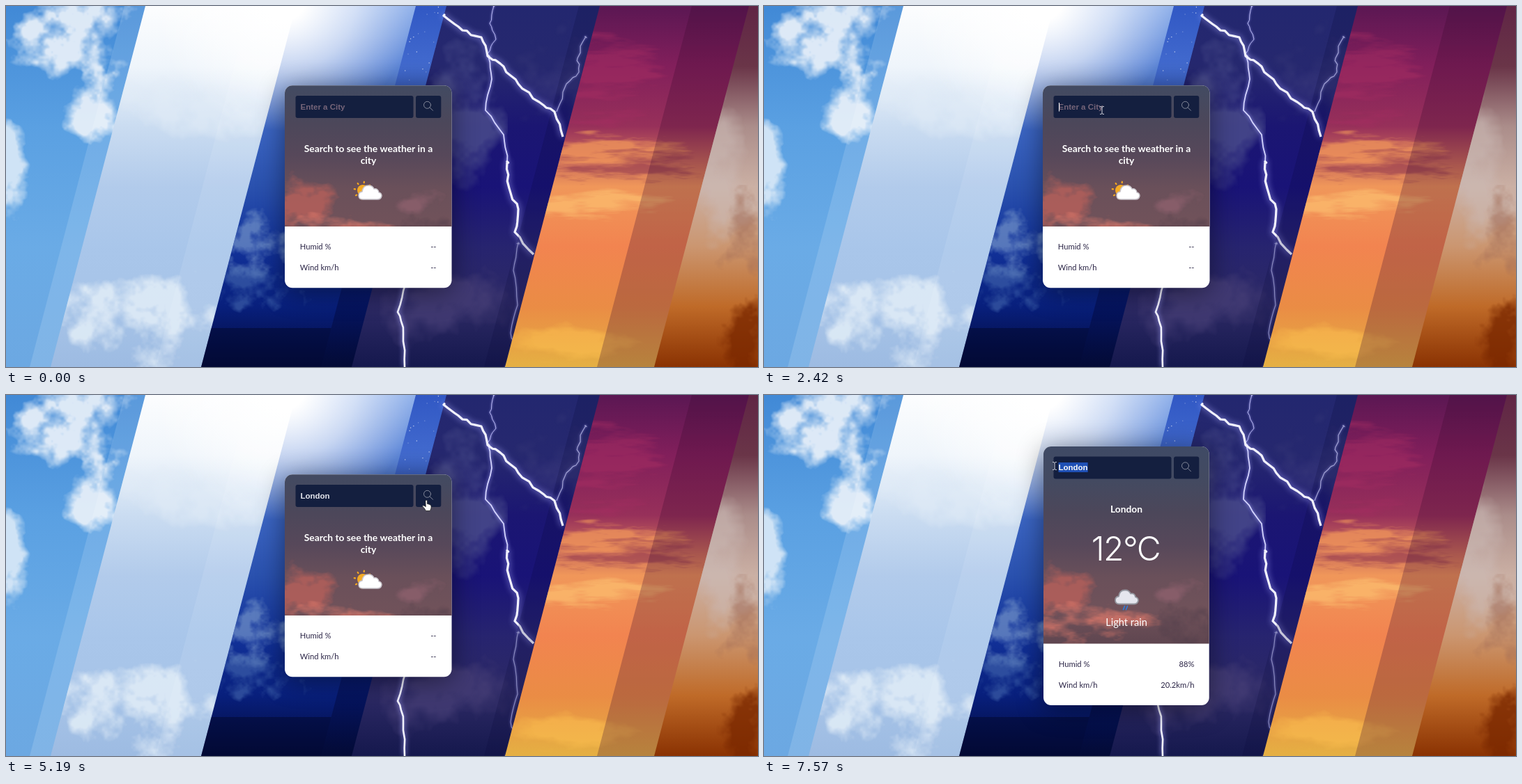
These frames come from a looping animation (1079x519 px, 8000 ms). An HTML page with a canvas:

```html
<!DOCTYPE html>
<html lang="en">
<head>
<meta charset="utf-8">
<title>Weather card</title>
<style>
  html, body { margin: 0; width: 100%; height: 100%; overflow: hidden; }
  canvas { display: block; }
</style>
</head>
<body>
<canvas id="stage" width="1079" height="519"></canvas>
<script>
const W = 1079, H = 519, LEAN = 136, LOOP = 8000;
const LATO = 'Lato, sans-serif';
const ARIAL = 'bold 11.5px "Liberation Sans", Arial, sans-serif';
const stage = document.getElementById('stage').getContext('2d');
let c = stage;

const clamp = v => Math.max(0, Math.min(1, v));
const smooth = k => k * k * (3 - 2 * k);
const mix = (a, b, k) => a + (b - a) * k;

function hash(x, y) {
  const s = Math.sin(x * 127.1 + y * 311.7) * 43758.5453;
  return s - Math.floor(s);
}

function noise(x, y) {
  const i = Math.floor(x), j = Math.floor(y), u = smooth(x - i), v = smooth(y - j);
  return mix(mix(hash(i, j), hash(i + 1, j), u), mix(hash(i, j + 1), hash(i + 1, j + 1), u), v);
}

function fractal(x, y) {
  let sum = 0;
  for (let o = 0, amp = 0.53; o < 4; o++, amp /= 2, x *= 2.1, y *= 2.1) sum += amp * noise(x, y);
  return sum;
}

function makeCanvas(w, h) {
  const canvas = document.createElement('canvas');
  canvas.width = w;
  canvas.height = h;
  return canvas;
}

function layer(paint) {
  const canvas = makeCanvas(W, H);
  c = canvas.getContext('2d');
  paint();
  c = stage;
  return canvas;
}

// Vertical gradient of evenly spaced colours
function fade(colors, y0 = 0, y1 = H) {
  const g = c.createLinearGradient(0, y0, 0, y1);
  colors.split(' ').forEach((color, i, all) => g.addColorStop(i / (all.length - 1), color));
  return g;
}

// Leaning stripe; x values are taken at the top edge
function band(x0, fill, paint, x1 = W + LEAN) {
  c.save();
  c.beginPath();
  c.moveTo(x0, 0);
  c.lineTo(x1, 0);
  c.lineTo(x1 - LEAN, H);
  c.lineTo(x0 - LEAN, H);
  c.clip();
  c.fillStyle = fill;
  c.fillRect(0, 0, W, H);
  if (paint) paint();
  c.restore();
}

// Ellipse with a billowing edge
function cloud(color, x, y, rx, ry, opacity = 0.9, grain = 34, stretch = 1) {
  const w = Math.ceil(rx * 2.6), h = Math.ceil(ry * 2.6), tile = makeCanvas(w, h), pen = tile.getContext('2d');
  const image = pen.createImageData(w, h), rgb = parseInt(color.slice(1), 16);
  for (let p = 0; p < w * h; p++) {
    const px = p % w - w / 2, py = Math.floor(p / w) - h / 2;
    const rim = (px / rx) ** 2 + (py / ry) ** 2;
    const body = fractal((px + x) / grain / stretch + 50, (py + y) / grain + 50);
    const alpha = clamp((body * 3 - 0.55 - rim) / 0.9) * opacity;
    image.data.set([rgb >> 16, rgb >> 8 & 255, rgb & 255, alpha * 255], p * 4);
  }
  pen.putImageData(image, 0, 0);
  c.drawImage(tile, x - w / 2, y - h / 2);
}

// Jagged bolt through "x,y" points
function bolt(route, width, color = '#f2f2ff') {
  const points = route.split(' ').map(p => p.split(',').map(Number));
  c.beginPath();
  points.forEach(([x, y], i) => {
    const [px, py] = points[Math.max(0, i - 1)];
    for (let k = 0.25; k < 1; k += 0.25) {
      c.lineTo(mix(px, x, k) + hash(x, k) * 4 - 2, mix(py, y, k) + hash(k, y) * 4 - 2);
    }
    c.lineTo(x, y);
  });
  c.strokeStyle = color;
  c.lineWidth = width;
  c.lineJoin = 'round';
  c.shadowColor = '#a8a8ff';
  c.shadowBlur = width * 3;
  c.stroke();
  c.shadowBlur = 0;
}

const sky = layer(() => {
  band(0, '#5aa0e2');
  c.fillStyle = fade('#4189d6 #5aa0e2 #6aabe6 #6ca8e2');
  c.fillRect(0, 0, W, H);
  cloud('#edf3fa', 95, 45, 95, 65);
  cloud('#edf3fa', 122, 140, 38, 70);
  cloud('#dceaf7', 4, 232, 30, 62);
  band(170, '#ffffff22');

  band(200, fade('#fcfdfe #eff5fb #cadcf1 #b2cbeb #a9c6ea #a7c4e8 #9dbbe2'), () => {
    cloud('#e3edf7', 270, 140, 120, 50, 0.6, 60);
    cloud('#e2edf7', 195, 450, 125, 65, 0.85);
  });

  band(416, fade('#8fb0ea #5f88d8 #3c66c4 #2a51ae #12329a #081f7c #030a3a'), () => {
    cloud('#6f8fc6', 355, 345, 55, 42, 0.75, 24);
    cloud('#4468ae', 350, 405, 75, 32, 0.6, 24);
    c.fillStyle = '#02083088';
    c.fillRect(0, 463, W, H);
  });
  const glare = c.createRadialGradient(400, -10, 30, 400, -10, 190);
  glare.addColorStop(0, '#fff');
  glare.addColorStop(0.45, '#ffffffa0');
  glare.addColorStop(1, '#ffffff00');
  c.fillStyle = glare;
  c.fillRect(200, 0, 400, 190);
  band(350, '#ffffff16', null, 416);

  band(588, fade('#3158c4 #426ace #3358ba #2346a6 #0c2690 #05145f #030a35'), () => {
    for (let i = 0; i < 34; i++) {
      c.fillStyle = i % 3 ? '#ffffff55' : '#ffffffbb';
      c.fillRect(565 + hash(i, 1) * 66, hash(i, 2) * 110, 1.2, 1.2);
    }
  });

  band(632, fade('#23276f #26286f #1b1672 #191377 #27246f #2c2964 #15184d'), () => {
    cloud('#50538f', 655, 140, 50, 130, 0.75, 60);
    cloud('#43437f', 790, 90, 60, 80, 0.5, 60);
    cloud('#4b4279', 640, 430, 80, 70, 0.65, 60);
    bolt('700,0 694,25 703,48 690,70', 1, '#b6b6f0');
    bolt('832,44 820,75 822,95 804,112 790,152', 1.2, '#c4c4f6');
    bolt('692,72 697,105 688,150 714,185 719,225', 1.8, '#d4d4ff');
    bolt('719,225 722,262 735,292 730,325 757,357', 3.2);
    bolt('735,340 728,380 734,430 724,470 735,495 716,519', 1.1, '#a9a9de');
    bolt('573,400 562,440 570,470 572,519', 2.6);
  });
  band(822, '#0a083830');
  bolt('628,14 655,35 682,45 691,72 714,87 735,112 765,138 787,152 799,188', 3.2);

  band(852, fade('#5b1753 #821f5b #97305a #f0975a #f28450 #ea8c45 #e5b043'), () => {
    cloud('#a82d62', 860, 105, 80, 60, 0.5, 14, 5);
    cloud('#f0955a', 870, 208, 110, 26, 0.8, 10, 6);
    cloud('#93384f', 880, 232, 110, 22, 0.6, 9, 6);
    cloud('#fcc070', 850, 285, 110, 22, 0.7, 12, 6);
    cloud('#ffc451', 800, 490, 90, 40, 0.5, 30, 2);
  });
  band(984, '#3a0a2d44');

  band(1066, fade('#602545 #6a3548 #ab8d8a #cbb0a4 #cb9670 #bf6a28 #8a3202'), () => {
    cloud('#cbbab6', 1025, 230, 65, 95, 0.6, 60);
    cloud('#a06a55', 1060, 335, 35, 60, 0.55);
    cloud('#7a2800', 1065, 475, 45, 55, 0.8);
  });
});

const photo = layer(() => {
  c.fillStyle = fade('#3f4a65 #434a61 #4c475a #57485a #6a505a #70525a #5f4650', 74, 357);
  c.fillRect(395, 70, 250, 290);
  cloud('#b9605a', 425, 275, 45, 42, 0.8, 24, 1.5);
  cloud('#8d606d', 600, 285, 35, 25, 0.8, 24, 1.5);
  cloud('#d9776a', 475, 332, 85, 30, 0.8, 20, 2);
  cloud('#4d3c49', 615, 332, 45, 35, 0.8);
});

function box(x, y, w, h, r, fill) {
  c.beginPath();
  c.roundRect(x, y, w, h, r);
  c.fillStyle = fill;
  c.fill();
}

function text(str, x, y, font, fill = '#fff', align = 'center') {
  c.font = font;
  c.fillStyle = fill;
  c.textAlign = align;
  c.fillText(str, x, y);
}

function shape(d, x, y, fill, stroke, width = 1) {
  const path = new Path2D(d);
  c.save();
  c.translate(x, y);
  c.lineJoin = c.lineCap = 'round';
  if (fill) { c.fillStyle = fill; c.fill(path); }
  if (stroke) { c.strokeStyle = stroke; c.lineWidth = width; c.stroke(path); }
  c.restore();
}

const CLOUD = 'M6 21Q0 21 0 15.5Q0 10.5 5 10Q6 1 14 1Q20 1 22 6Q28 5 29 11Q33 12 33 16Q32 21 27 21Z';

function sunIcon() {
  for (let a = 0; a < 8; a++) {
    c.save();
    c.translate(512, 265);
    c.rotate(a * Math.PI / 4 + 0.15);
    box(-1.1, -13.5, 2.2, 3.5, 1, '#f5a81f');
    c.restore();
  }
  box(504, 257, 16, 16, 8, '#f5ab25');
  shape(CLOUD, 506, 257, '#fff', '#c9c5cc', 1.5);
}

function rainIcon() {
  shape(CLOUD, 504, 279.5, '#e5e6ee', '#94969f', 1.8);
  shape('M2 0L0 5M6 0L4 5', 515.5, 303.5, null, '#3479d3', 1.8);
}

// Each move starts where the one before ended and advances in equal steps
const easeOut = k => 1 - (1 - k) ** 2.1;
const MOVES = [
  { from: 240, to: 1490, steps: 19, x: 485, y: 155, ease: easeOut },
  { from: 1560, to: 1630, steps: 2, x: 485, y: 150, ease: smooth },
  { from: 4570, to: 5190, steps: 9, x: 602, y: 150, ease: smooth, arc: 15 },
  { from: 6330, to: 7330, steps: 14, x: 411, y: 102, ease: smooth, easeY: k => 1 - (1 - smooth(k)) ** 4 },
  { from: 7400, to: 7570, steps: 3, x: 417, y: 102, ease: smooth }
];

function pointerAt(t) {
  let x = 1033, y = 508;
  for (const m of MOVES) {
    if (t < m.from) break;
    const step = Math.floor((t - m.from) / (m.to - m.from) * (m.steps - 1) + 1.1);
    const k = clamp(step / m.steps);
    x = mix(x, m.x, m.ease(k));
    y = mix(y, m.y, (m.easeY || m.ease)(k)) - (m.arc || 0) * Math.sin(Math.PI * k);
  }
  return [Math.round(x), Math.round(y)];
}

const REFOCUS = 6960, CLICK = 5190, RESULT = 5780;

function drawPointer(x, y, t, shift) {
  const row = y > 128 + shift && y < 161 + shift;
  if (t >= REFOCUS || (row && x > 415 && x < 585)) {
    shape('M-2.5-5.5Q0-5.5 0-4.5Q0-5.5 2.5-5.5M0-4.5V4.5M-2.5 5.5Q0 5.5 0 4.5Q0 5.5 2.5 5.5', x, y, null, '#d5d7df');
  } else if (row && x > 588 && x < 624) {
    shape('M0 1.5Q1.2-.5 2.4 1.5V6L4 6.3L6 7L8 8.5V12L6.5 16H.5L-2 12L-4.5 9.5Q-3.5 7.5-1.5 9L0 10Z', x, y + 0.5, '#fff', '#222', 0.8);
  } else {
    shape('M0 0V12.2L2.7 9.7L4.6 14L6.3 13.2L4.5 9H8.2Z', x, y, '#fff', '#222', 0.8);
  }
}

// The caret blinks after focus and stays on while typing
function caretOn(t) {
  if (t < 1900 || t >= CLICK) return false;
  const since = t < 3070 ? t - 1900 : Math.max(0, t - 3760);
  return Math.floor(since / 530) % 2 === 0;
}

function drawInput(t, pointerX, shift) {
  box(415.5, 129 + shift, 169, 32, 3, '#141f3f');
  box(588, 129 + shift, 36.3, 32, 3, '#141f3f');
  shape('M10 5A5 5 0 1 1 0 5A5 5 0 1 1 10 5M8.7 8.7L13 13', 599.5, 137.3 + shift, null, '#858a9b');

  const left = 422.5, value = 'London'.slice(0, Math.max(0, Math.floor((t - 3070) / 138) + 1));
  c.font = ARIAL;
  const end = left + c.measureText(value).width;
  if (t >= REFOCUS) {
    const from = Math.max(left, Math.min(end, pointerX));
    c.fillStyle = '#1f50b5';
    c.fillRect(from, 97, end - from, 14);
  }
  const focused = t < CLICK || t >= REFOCUS;
  text(value || 'Enter a City', left, 148.5 + shift, ARIAL, !value ? '#766579' : focused ? '#f8f8fa' : '#e4e6ee', 'left');
  if (caretOn(t)) {
    c.fillStyle = '#fff';
    c.fillRect(Math.round(end), 139, 1, 12.5);
  }
}

function drawCard(t, pointerX, shift) {
  const found = t >= RESULT;
  const [x, y, w, h, split] = found ? [401, 74, 237.7, 372, 357.5] : [400, 114.3, 239.5, 291, 317];

  c.save();
  c.shadowColor = '#0007';
  c.shadowBlur = 38;
  c.shadowOffsetY = 5;
  box(x, y, w, h, 11, '#fff');
  c.restore();
  c.save();
  c.beginPath();
  c.roundRect(x, y, w, split - y, [11, 11, 0, 0]);
  c.clip();
  c.drawImage(photo, 0, 0);
  c.restore();
  drawInput(t, pointerX, shift);

  const title = 'bold 13.8px ' + LATO, small = '11.2px ' + LATO, ink = '#2b2546';
  if (found) {
    text('London', 520, 169, title);
    c.letterSpacing = '-1.5px';
    text('12°C', 519, 238, '300 48px Inter, sans-serif');
    c.letterSpacing = '0px';
    rainIcon();
    text('Light rain', 520, 331.5, '14.6px ' + LATO);
  } else {
    text('Search to see the weather in a', 520, 210, title);
    text('city', 520, 227, title);
    sunIcon();
  }
  [['Humid %', '88%'], ['Wind km/h', '20.2km/h']].forEach(([label, reading], i) => {
    const base = split + 33.4 + i * 30;
    text(label, x + 21.8, base, small, ink, 'left');
    text(found ? reading : '--', 617.5, base, small, ink, 'right');
  });
}

const start = performance.now();

function frame(now) {
  const t = Math.max(0, now - start) % LOOP;
  const shift = t >= RESULT ? -40.5 : 0, [x, y] = pointerAt(t);
  c.drawImage(sky, 0, 0);
  drawCard(t, x, shift);
  if (t >= MOVES[0].from) drawPointer(x, y, t, shift);
  requestAnimationFrame(frame);
}
requestAnimationFrame(frame);
</script>
</body>
</html>
```
